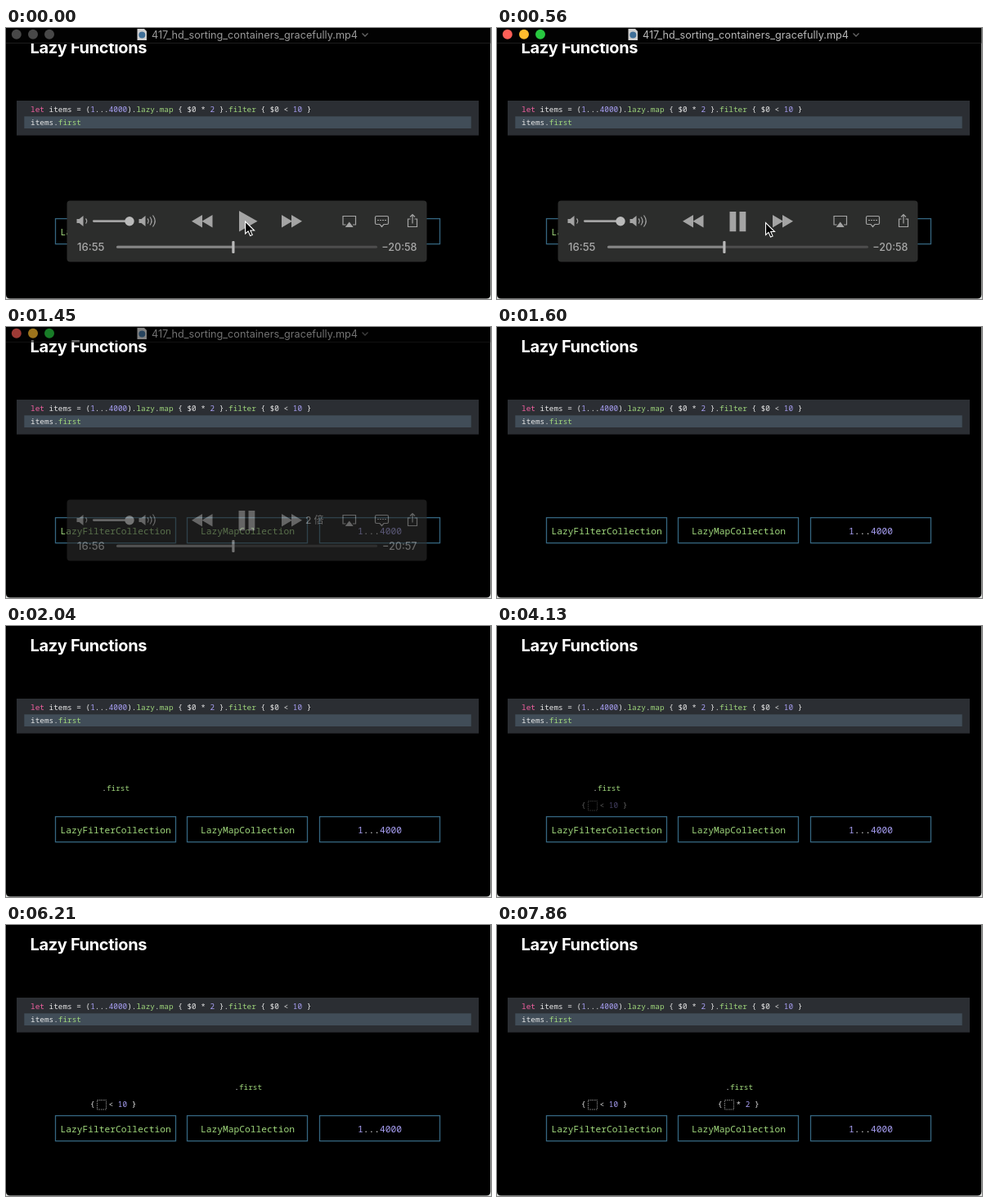
These frames come from a looping animation (593 by 332 pixels, 8 s). An HTML page:

```html
<!DOCTYPE html>
<html lang="en">
<head>
<meta charset="utf-8">
<title>Lazy Functions</title>
<style>
  html, body { margin: 0; width: 100%; height: 100%; overflow: hidden; background: #dcdedc; }
  svg { display: block; }
  text { fill: #e6e6e6; white-space: pre; }
  .title { font: 700 20px Inter, sans-serif; letter-spacing: -.35px; fill: #fff; }
  .code, .label { font: 500 9.4px "Noto Sans Mono", monospace; }
  .label { font-weight: 400; font-size: 11.28px; }
  .k { fill: #f0609f; }
  .n { fill: #a9a0f5; }
  .g { fill: #a0d87c; }
  .node rect { fill: none; stroke: #356680; stroke-width: 1.3; }
  .slot { fill: none; stroke: #a8a8a8; stroke-width: .8; stroke-dasharray: 1.5 1; }
  .ui text { font: 500 13.1px Inter, "Noto Sans CJK SC", sans-serif; fill: #a8a8a8; }
  .ui .file { font-weight: 400; font-size: 12.7px; }
  .ui .left { font-size: 12.6px; }
  .ui .speed { font-size: 12px; }
  .icon { fill: #a4a4a4; }
  .line { fill: none; stroke: #a4a4a4; stroke-width: 1.2; }
</style>
</head>
<body>
<svg width="593" height="332" viewBox="0 0 593 332">
  <path d="M0 0H592.3V326.4Q592.3 331.4 587.3 331.4H5Q0 331.4 0 326.4Z" fill="#000"/>

  <text class="title" x="29.5" y="31">Lazy Functions</text>
  <rect x="13" y="89" width="565" height="42.6" fill="#2b2e33"/>
  <rect x="22.3" y="108.3" width="546.4" height="14.7" fill="#414d58"/>
  <text class="code" x="30" y="103"><tspan class="k">let</tspan> items = (<tspan class="n">1</tspan>...<tspan class="n">4000</tspan>).<tspan class="g">lazy</tspan>.<tspan class="g">map</tspan> { $0 * <tspan class="n">2</tspan> }.<tspan class="g">filter</tspan> { $0 &lt; <tspan class="n">10</tspan> }</text>
  <text class="code" x="30" y="119">items.<tspan class="g">first</tspan></text>

  <g class="node">
    <rect x="60.5" y="233.6" width="147" height="31"/>
    <rect x="221.5" y="233.6" width="147" height="31"/>
    <rect x="383.5" y="233.6" width="147" height="31"/>
    <text class="label g" x="66.5" y="254">LazyFilterCollection</text>
    <text class="label g" x="238" y="254">LazyMapCollection</text>
    <text class="label" x="430" y="254"><tspan class="n">1</tspan>...<tspan class="n">4000</tspan></text>
  </g>

  <text id="call" class="code" x="117.3" y="202">.<tspan class="g">first</tspan></text>
  <g id="filterBody">
    <text class="code" x="103" y="223">{   &lt; <tspan class="n">10</tspan> }</text>
    <rect class="slot" x="111.5" y="214.5" width="11" height="11.5"/>
  </g>
  <g id="mapBody">
    <text class="code" x="270" y="223">{   * <tspan class="n">2</tspan> }</text>
    <rect class="slot" x="278.5" y="214.5" width="11" height="11.5"/>
  </g>

  <g id="ui" class="ui">
    <rect width="592.3" height="18" fill="#020202"/>
    <rect y="18" width="592.3" height="1" fill="#1c1c1c"/>
    <g id="lights">
      <circle cx="12.8" cy="7.7" r="6"/>
      <circle cx="33" cy="7.7" r="6"/>
      <circle cx="53" cy="7.7" r="6"/>
    </g>
    <path d="M160.5 1H169L172 4V15H160.5Z" fill="#d0d0d0"/>
    <circle cx="166.3" cy="8.5" r="4" fill="#3f6f98"/>
    <text id="file" class="file" x="178" y="13">417_hd_sorting_containers_gracefully.mp4</text>
    <path d="M435.5 6.500l3.5 3.5 3.5-3.5" fill="none" stroke="#666" stroke-width="1.3"/>

    <rect x="74.5" y="211.5" width="440" height="75" rx="4" fill="#2c2d2c"/>
    <path class="icon" d="M86.500 234h3l5-4v13l-5-4h-3zM162.500 234h3l5-4v13l-5-4h-3z"/>
    <path class="line" d="M97.500 233.500q2.500 3 0 6M173 233.500q2.500 3 0 6M176 231.500q4 5 0 10M179.500 229.500q5.500 7 0 14"/>
    <rect class="icon" x="106" y="235.3" width="45" height="2.6" rx="1.3"/>
    <circle cx="151" cy="236.7" r="5.7" fill="#bababa"/>
    <path class="icon" d="M240 229v15.500l-13-7.700zM252.500 229v15.500l-13-7.700z"/>
    <path id="play" class="icon" d="M285 224l22.500 12.800-22.500 12.800z"/>
    <path id="pause" class="icon" d="M284.500 225h7.800v24.300h-7.800zM296.500 225h7.800v24.300h-7.800z"/>
    <path id="forward" d="M337 229v15.500l13-7.700zM349 229v15.500l13-7.700z"/>
    <text id="speed" class="speed" x="366" y="241">2 倍</text>

    <path class="line" d="M415.500 241h-3.500v-10.500h15.500v10.500h-3.500"/>
    <path class="icon" d="M419.700 237.500l5 6.500h-10z"/>
    <path class="line" d="M453 230.500h13q1.500 0 1.500 1.500v7q0 1.500-1.500 1.500h-4l-2.500 3-2.500-3h-4q-1.500 0-1.500-1.500v-7q0-1.500 1.500-1.500z"/>
    <path class="line" d="M454 235.500h11" stroke-dasharray="2 1"/>
    <path class="line" d="M494.500 234h-3v9.500h11v-9.500h-3M497 239.500v-10.500M494 231.500l3-3 3 3"/>

    <text id="elapsed" x="87" y="273"></text>
    <text id="left" class="left" x="502.5" y="273" text-anchor="end"></text>
    <rect x="135" y="266.7" width="319" height="3" rx="1.5" fill="#4d4d4d"/>
    <rect x="135" y="266.7" width="143" height="3" rx="1.5" fill="#858585"/>
    <rect x="276.3" y="261" width="3.2" height="15" rx="1" fill="#b8b8b8"/>
  </g>
  <path id="cursor" d="M0 0V15L3.500 11.800 6 17.500 8.600 16.400 6.200 11H11Z" fill="#000" stroke="#fff" stroke-width="1.1"/>
</svg>
<script>
const LOOP = 8000;
const $ = id => document.getElementById(id);
const ticks = [0, 430, 560, 710, 1010, 1160, 1300, 1450, 1600, 1740, 1890, 2040,
  4130, 4270, 5770, 5910, 6060, 6210, 7710, 7860];
const pointer = [[0, 292.6, 237], [430, 300, 237.5], [560, 328.5, 238.5], [710, 335, 239], [1300, 356.8, 274]];
const lightColors = ["#ff5f57", "#febc2e", "#28c840"];

const ramp = (t, start, length) => Math.min(1, Math.max(0, (t - start) / length));
const ease = u => u < .5 ? 4 * u ** 3 : 1 - 4 * (1 - u) ** 3;
const alpha = (id, value) => $(id).setAttribute("opacity", value);
const move = (id, x, y) => $(id).setAttribute("transform", `translate(${x} ${y})`);

function draw(time) {
  const t = ticks.findLast(tick => tick <= time);
  const playing = t >= 430;

  alpha("ui", 1 - ramp(t, 1395, 145));
  [...$("lights").children].forEach((c, i) => c.setAttribute("fill", playing ? lightColors[i] : "#484848"));
  $("file").style.fill = playing ? "#b8b8b8" : "#999";
  alpha("play", +!playing);
  alpha("pause", +playing);
  $("forward").setAttribute("fill", t === 1010 ? "#e8e8e8" : "#a4a4a4");
  alpha("speed", +(t >= 1010));
  $("elapsed").textContent = t < 1300 ? "16:55" : "16:56";
  $("left").textContent = t < 1300 ? "−20:58" : "−20:57";

  const [, x, y] = pointer.findLast(p => p[0] <= t);
  move("cursor", x, y);
  alpha("cursor", +(t < 1450));

  alpha("call", ramp(t, 1660, 360));
  move("call", 162 * ease(ramp(t, 5715, 410)), 0);
  alpha("filterBody", ramp(t, 4050, 200));
  alpha("mapBody", ramp(t, 7630, 200));
}

function frame() {
  draw(performance.now() % LOOP);
  requestAnimationFrame(frame);
}
frame();
</script>
</body>
</html>
```
